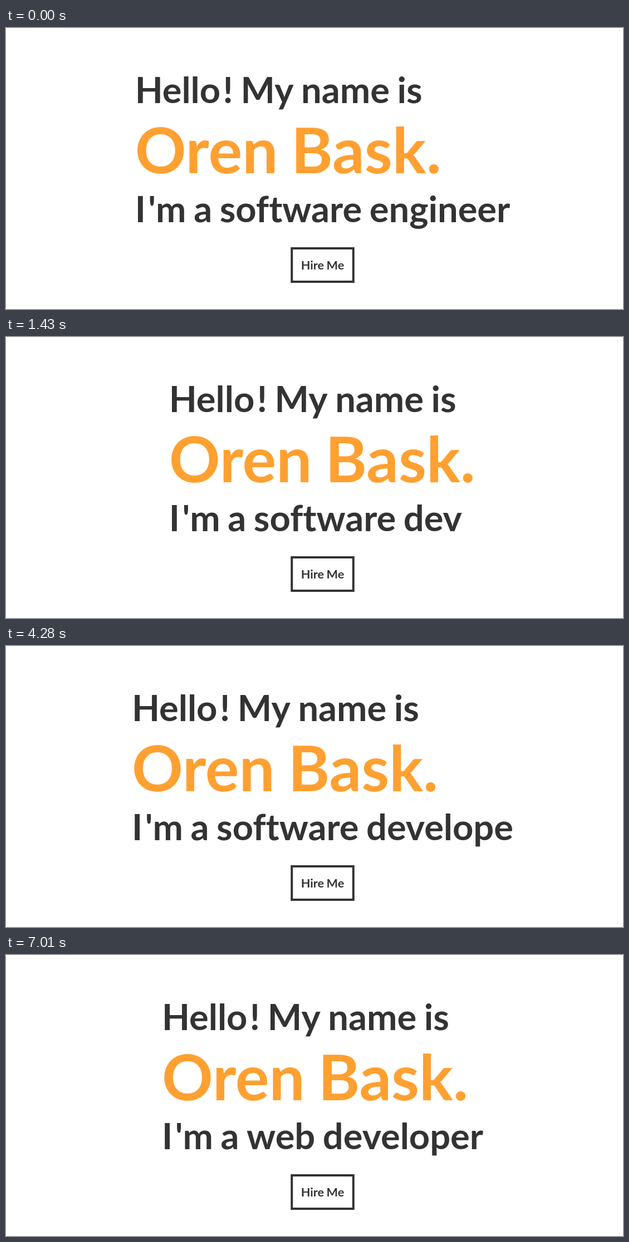
An HTML page with a canvas for the animation above (8 s loop, 1108x505 px).

```html
<!DOCTYPE html>
<html lang="en">
<head>
<meta charset="utf-8">
<title>Typed intro</title>
<style>
  html, body { margin: 0; width: 100%; height: 100%; overflow: hidden; background: #fff; }
  canvas { display: block; }
</style>
</head>
<body>
<canvas id="stage" width="1108" height="505"></canvas>
<script>
const ctx = document.getElementById('stage').getContext('2d');
const LOOP = 8000;
const CENTER = 568.5;
const MIN_WIDTH = 551.5;
const DARK = '#333';
const ORANGE = '#ffa031';
const BIG = 113.75, MEDIUM = 65, SMALL = 21.67;

// Spacing in em: tighter words, a little air before ! and '
const WORD_GAP = -0.034;
const MARK_GAP = 0.068;

const ENGINEER = "I'm a software engineer";
const DEVELOPER = "I'm a software developer";
const WEB = "I'm a web developer";

// Typing runs: start, end, phrase, first and last visible length
const RUNS = [
  [0, 0, ENGINEER, 23, 23],
  [500, 760, ENGINEER, 22, 19],
  [890, 1090, ENGINEER, 18, 15],
  [1230, 1290, DEVELOPER, 16, 17],
  [1430, 1700, DEVELOPER, 18, 21],
  [1830, 2030, DEVELOPER, 22, 24],
  [4280, 4350, DEVELOPER, 23, 22],
  [4450, 4750, DEVELOPER, 21, 18],
  [4820, 5010, DEVELOPER, 17, 15],
  [5210, 5810, DEVELOPER, 13, 6],
  [5950, 6020, WEB, 7, 8],
  [6150, 6150, WEB, 9, 9],
  [6350, 7010, WEB, 11, 19]
];

function typedAt(t) {
  const [start, end, phrase, from, to] = RUNS.findLast(run => run[0] <= t);
  const progress = end > start ? Math.min(1, (t - start) / (end - start)) : 1;
  const steps = Math.floor(progress * Math.abs(to - from) + 1e-6);
  return phrase.slice(0, from + Math.sign(to - from) * steps);
}

function layout(text, size) {
  ctx.font = `700 ${size}px Lato, sans-serif`;
  ctx.wordSpacing = `${WORD_GAP * size}px`;
  ctx.letterSpacing = '0.01px'; // any spacing turns ligatures off
  let width = 0;
  const parts = text.split(/(?=[!'])/).map((part, i) => {
    const x = width + (i ? MARK_GAP * size : 0);
    width = x + ctx.measureText(part).width;
    return { part, x };
  });
  return { parts, width };
}

function write(text, x, y, size, color = DARK) {
  const { parts } = layout(text, size);
  ctx.fillStyle = color;
  for (const p of parts) ctx.fillText(p.part, x + p.x, y);
}

function drawButton() {
  const label = 'Hire Me';
  ctx.strokeStyle = DARK;
  ctx.lineWidth = 4;
  ctx.strokeRect(CENTER - 55.25, 396, 110.5, 60);
  write(label, CENTER - layout(label, SMALL).width / 2, 434, SMALL);
}

function draw(t) {
  ctx.fillStyle = '#fff';
  ctx.fillRect(0, 0, 1108, 505);

  // The block is centred and grows with its last line
  const typed = typedAt(t);
  const left = CENTER - Math.max(MIN_WIDTH, layout(typed, MEDIUM).width) / 2;

  write('Hello! My name is', left, 135, MEDIUM);
  write('Oren Bask.', left, 261, BIG, ORANGE);
  write(typed, left, 349, MEDIUM);
  drawButton();
}

const began = performance.now();
function tick() {
  draw((performance.now() - began) % LOOP);
  requestAnimationFrame(tick);
}
tick();
</script>
</body>
</html>
```
